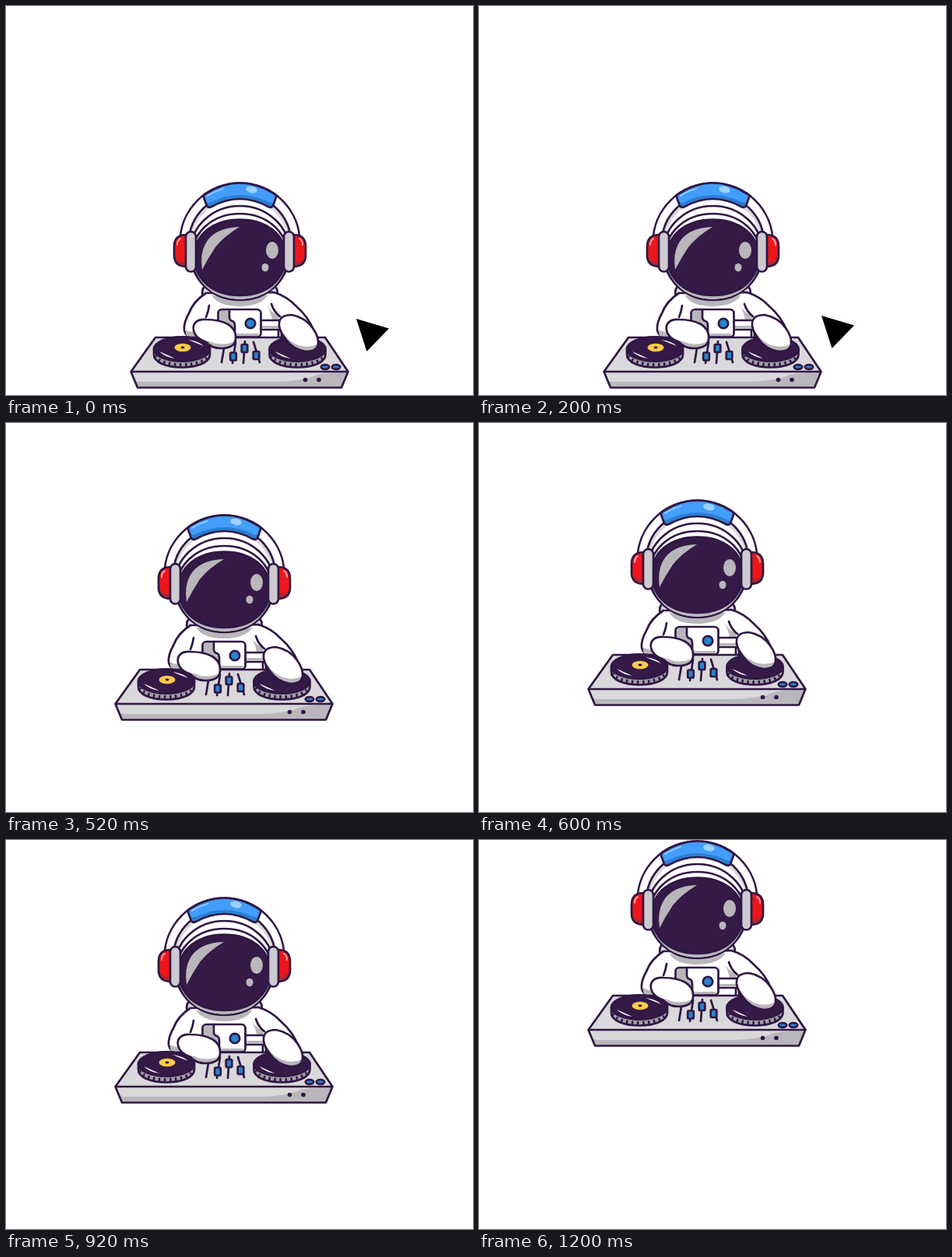
An HTML page for the animation above (1.4 s loop, 600 by 500 pixels).

```html
<!DOCTYPE html>
<html lang="en">
<head>
<meta charset="utf-8">
<title>Astronaut DJ</title>
<style>
  html, body { margin: 0; width: 100%; height: 100%; overflow: hidden; background: #fff; }
  svg { display: block; width: 600px; height: 500px; }
  .ink { stroke: #301744; stroke-width: 2.7; stroke-linejoin: round; stroke-linecap: round; }
  .dark { fill: #351947; }
  .white { fill: #fff; }
  .light { fill: #d9d8da; }
  .pad { fill: #cdcbd0; }
  .gray { fill: #b9b7bb; }
  .blue { fill: #439dfb; }
  .knob { fill: #2685cf; }
  .red { fill: #ed171b; }
  .line { fill: none; }
  #dj { animation: rise 1.4s step-end infinite; }
  #cursor { animation: slide 1.4s step-end infinite; }
  @keyframes rise {
    0% { transform: translate(0, 0); }
    28.5714% { transform: translate(-20px, -109px); }
    42.8571% { transform: translate(-20px, -128px); }
    57.1428% { transform: translate(-20px, -153px); }
    71.4285% { transform: translate(-20px, -209px); }
    85.7142% { transform: translate(-20px, -226px); }
  }
  @keyframes slide {
    0% { transform: translate(0, 0); visibility: visible; }
    14.2857% { transform: translate(-10px, -4px); visibility: visible; }
    28.5714%, 100% { visibility: hidden; }
  }
</style>
</head>
<body>
<svg viewBox="0 0 600 500">
  <defs>
    <g id="cup">
      <path class="red" d="M232 294Q216 294 216 309V322Q217 335 232 335Z"/>
      <path fill="#b5242f" d="M217 322Q221 329 232 329V335Q218 335 217 322Z"/>
      <path class="line" stroke="#ff9a9a" stroke-width="2" stroke-linecap="round" d="M220 307Q220 301 224 299"/>
      <path class="ink line" d="M232 294Q216 294 216 309V322Q217 335 232 335Z"/>
      <rect class="ink pad" x="231" y="290" width="13" height="51.500" rx="6.500"/>
    </g>
    <g id="platter">
      <path class="ink" fill="#a29fa6" d="M-36 0V7C-36 17 -20 23.500 0 23.500S36 17 36 7V0Z"/>
      <path class="line" stroke="#301744" stroke-width="5" stroke-dasharray="2.500 4.500" d="M-35 9C-31 16 -17 20.500 0 20.500S31 16 35 9"/>
      <ellipse class="ink dark" rx="36" ry="15.700"/>
      <path class="white" d="M8 -12Q22 -10 28 -4Q18 -8 8 -12Z"/>
      <path class="white" d="M-29 3Q-22 10 -9 12Q-20 7 -29 3Z"/>
    </g>
    <g id="slider">
      <rect class="ink knob" x="-3.800" y="-5" width="7.600" height="10" rx="1.500"/>
    </g>
  </defs>

  <path id="cursor" d="M450 402L492 414.500L463.500 444Z"/>

  <g id="dj">
    <!-- suit -->
    <path class="ink light" d="M257 359Q250 363 253 374L262 378M344 359Q351 363 348 374L339 378"/>
    <path class="ink white" d="M257 369Q241 379 235 395Q228 407 229 417Q231 426 244 428H372L396 418Q388 399 373 386Q361 373 344 368Z"/>
    <path class="gray" d="M264 371Q300 384 337 371Q328 386 300 386T264 371Z"/>
    <path class="gray" d="M334 384Q341 394 351 399L350 404H342Q341 394 334 384Z"/>
    <path class="gray" d="M231 416Q236 420 244 418L246 426H235Q230 424 231 416Z"/>
    <path class="ink line" d="M261 385Q260 393 257 400M341 383Q344 393 352 399M350 416V426M354 417V426"/>
    <path class="ink white" d="M327 404H352V416H327Z"/>
    <path class="gray" d="M328 411H351V415H328Z"/>
    <rect class="white" x="272.500" y="390" width="55" height="35.500" rx="5"/>
    <path class="gray" d="M278 391H287V402Q294 405 294 412V425H274V396Q274 391 278 391Z"/>
    <path class="gray" d="M294 421H325Q324 425 321 425H294Z"/>
    <path class="ink line" d="M287 390V400Q287 404 291 405Q294 406 294 411V425"/>
    <rect class="ink line" x="272.500" y="390" width="55" height="35.500" rx="5"/>
    <circle class="ink knob" cx="314" cy="408" r="6.200"/>

    <!-- helmet -->
    <ellipse class="ink white" cx="300.500" cy="317" rx="64" ry="60"/>
    <path class="ink white" d="M300.500 267C337 267 362 292 362 322C362 354 335 378 300.500 378S239 354 239 322C239 292 264 267 300.500 267Z"/>
    <path class="gray" d="M249 351Q266 370 300.500 370T352 351Q336 376.500 300.500 376.500T249 351Z"/>
    <path class="ink dark" d="M300.500 274.500C334 274.500 359 293 359 322C359 352 335 372 300.500 372S242 352 242 322C242 293 267 274.500 300.500 274.500Z"/>
    <path class="gray" d="M300 284Q267 285 256 306Q249 319 252 339Q259 325 269 310Q280 296 300 284Z"/>
    <ellipse class="gray" cx="342" cy="314" rx="8" ry="11"/>
    <ellipse class="gray" cx="333" cy="336" rx="4.500" ry="5.200"/>

    <!-- headphones -->
    <path class="white" d="M223.500 304A77 76.500 0 0 1 377.500 304H366A65.500 63 0 0 0 235 304Z"/>
    <path class="line" stroke="#d9d8da" stroke-width="3" d="M237 298A68 66 0 0 1 260 259M364 298A68 66 0 0 0 341 259"/>
    <path class="ink line" d="M223.500 304A77 76.500 0 0 1 377.500 304M366 304A65.500 63 0 0 0 235 304"/>
    <path class="blue" d="M257 241Q300.500 214 344 241Q348 243 347 246L343 257Q341 260 337 258Q300.500 238 264 258Q260 260 258 257L254 246Q253 243 257 241Z"/>
    <path fill="#2b7ed2" d="M256 251Q258 254 263 252Q300.500 234 338 252Q343 254 345 251L343 257Q341 260 337 258Q300.500 238 264 258Q260 260 258 257Z"/>
    <ellipse cx="315.500" cy="236" rx="7.500" ry="4.300" fill="#9bd0ff" transform="rotate(10 315.500 236)"/>
    <path class="line" stroke="#9bd0ff" stroke-width="1.800" stroke-linecap="round" d="M259 244Q268 238 279 235"/>
    <path class="ink line" d="M257 241Q300.500 214 344 241Q348 243 347 246L343 257Q341 260 337 258Q300.500 238 264 258Q260 260 258 257L254 246Q253 243 257 241Z"/>
    <use href="#cup"/>
    <use href="#cup" transform="matrix(-1 0 0 1 601 0)"/>

    <!-- mixer -->
    <path class="light" d="M192 426H410L439.500 470L431 490.500H169L160.500 470Z"/>
    <path class="gray" d="M165 481Q168 483 176 483H345Q380 482 394 476Q405 471 439 471L431 490.500H169Z"/>
    <path class="ink line" d="M192 426H410L439.500 470L431 490.500H169L160.500 470ZM160.500 470H439.500"/>
    <circle cx="384.500" cy="480.500" r="2.800" fill="#301744"/>
    <circle cx="402" cy="480.500" r="2.800" fill="#301744"/>
    <ellipse class="ink knob" cx="410" cy="464" rx="5.200" ry="2.800"/>
    <ellipse class="ink knob" cx="424" cy="464" rx="5.200" ry="2.800"/>
    <use href="#platter" x="226" y="441"/>
    <ellipse cx="227" cy="439" rx="10.500" ry="5.200" fill="#f9cb48"/>
    <ellipse cx="227" cy="439" rx="2.500" ry="1.400" fill="#301744"/>
    <use href="#platter" x="374.500" y="441"/>
    <path class="ink line" d="M281 434L277 458M295 432L291 459M307 431L305 459M318 432L326 458"/>
    <use href="#slider" x="292" y="450.500"/>
    <use href="#slider" x="306.500" y="440"/>
    <use href="#slider" x="321.500" y="449"/>

    <!-- gloves -->
    <path class="white" d="M241 417C239 407 247 402 257 403Q274 403 285 409Q295 415 295 425C296 436 288 440 276 440Q264 440 257 432Q243 427 241 417Z"/>
    <path class="gray" d="M242 421Q250 429 262 431Q277 438 294 431Q291 439 276 439Q264 439 257 431Q245 427 242 421Z"/>
    <path class="ink line" d="M241 417C239 407 247 402 257 403Q274 403 285 409Q295 415 295 425C296 436 288 440 276 440Q264 440 257 432Q243 427 241 417Z"/>
    <path class="white" d="M351 411C350 401 356 397 367 397Q384 400 394 414Q402 425 401 434C400 442 394 444 385 444Q368 441 360 429Q352 419 351 411Z"/>
    <path class="gray" d="M352 415Q360 428 371 434Q386 441 400 435Q397 443 385 443Q368 440 361 429Q354 421 352 415Z"/>
    <path class="ink line" d="M351 411C350 401 356 397 367 397Q384 400 394 414Q402 425 401 434C400 442 394 444 385 444Q368 441 360 429Q352 419 351 411Z"/>
  </g>
</svg>
</body>
</html>
```
